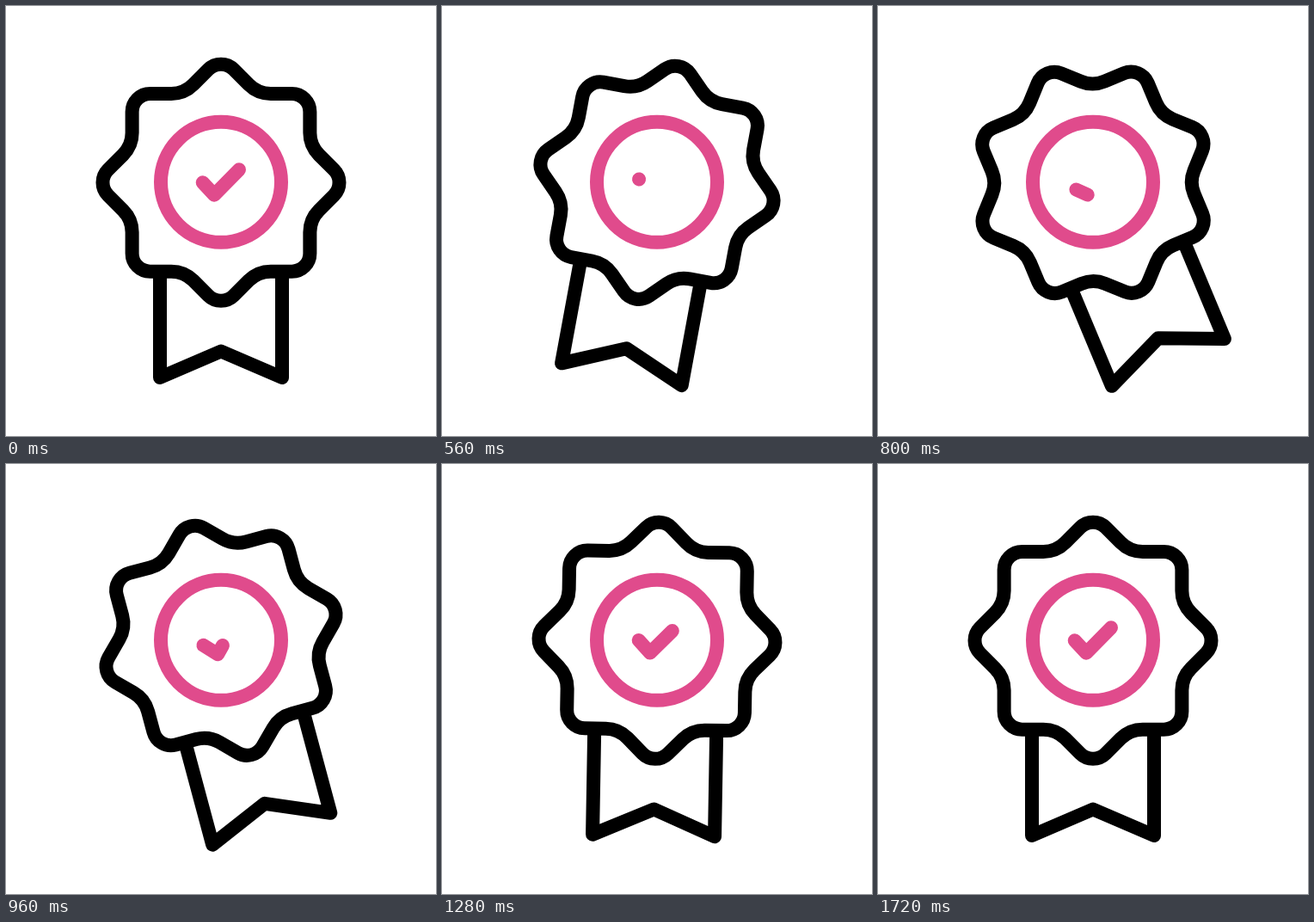
These frames come from a looping animation (500 px wide and 500 px high, 2040 ms). An HTML page:

```html
<!DOCTYPE html>
<html lang="en">
<head>
<meta charset="utf-8">
<title>Award badge</title>
<style>
  html, body { margin: 0; width: 100%; height: 100%; overflow: hidden; background: #fff; }
  svg { display: block; width: 100vw; height: 100vh; }
  g { fill: none; stroke-width: 16; stroke-linecap: round; stroke-linejoin: round; }
</style>
</head>
<body>
<svg viewBox="0 0 500 500">
  <g id="award" stroke="#000">
    <path id="rosette"/>
    <path d="M179 312V432L250 401.5L321 432V312"/>
    <path id="check" stroke="#e04b8c" d="M228.7 205.3L242.2 219.7L271 190.3"/>
  </g>
  <g stroke="#e04b8c"><circle cx="250" cy="204.8" r="70"/></g>
</svg>
<script>
const LOOP = 2040, STEP = 40, CX = 250, CY = 205.3;
const $ = id => document.getElementById(id);
const award = $('award'), check = $('check');
const checkLength = check.getTotalLength();

// Eight rounded points joined by 45 degree flanks and wide round valleys
function rosettePath() {
  let d = '';
  for (let i = 0; i < 8; i++) {
    const c = Math.cos(i * Math.PI / 4), s = Math.sin(i * Math.PI / 4);
    const at = (x, y) => `${(CX + x * c - y * s).toFixed(2)} ${(CY + x * s + y * c).toFixed(2)}`;
    d += i ? `A36 36 0 0 0 ${at(-32.3, -113.9)}` : `M${at(-32.3, -113.9)}`;
    d += `L${at(-14.85, -131.35)}A21 21 0 0 1 ${at(14.85, -131.35)}L${at(32.3, -113.9)}`;
  }
  return d + `A36 36 0 0 0 ${CX - 32.3} ${CY - 113.9}Z`;
}

// Swing turning points: [ms, degrees]
const SWING = [[100, 0], [525, 11.5], [845, -24.4], [1146, 5], [1440, -4.3], [1720, 0]];
const clamp = u => Math.min(1, Math.max(0, u));
const ease = u => (1 - Math.cos(Math.PI * clamp(u))) / 2;

function angle(t) {
  let a = 0;
  for (let i = 1; i < SWING.length; i++) {
    const [t0, a0] = SWING[i - 1], [t1, a1] = SWING[i];
    a += (a1 - a0) * ease((t - t0) / (t1 - t0));
  }
  return a;
}

function drawn(t) {
  if (t < 680) return 1 - ease((t - 100) / 220);
  return 1 - Math.pow(1 - clamp((t - 676) / 740), 1.5);
}

function render(ms) {
  const t = Math.floor(ms % LOOP / STEP) * STEP;
  award.setAttribute('transform', `rotate(${angle(t).toFixed(3)} ${CX} ${CY})`);
  const p = drawn(t);
  check.setAttribute('stroke-dasharray', p >= 1 ? 'none' : `${Math.max(0.01, p * checkLength)} 200`);
}

$('rosette').setAttribute('d', rosettePath());
const start = performance.now();
function tick() {
  render(performance.now() - start);
  requestAnimationFrame(tick);
}
tick();
</script>
</body>
</html>
```
